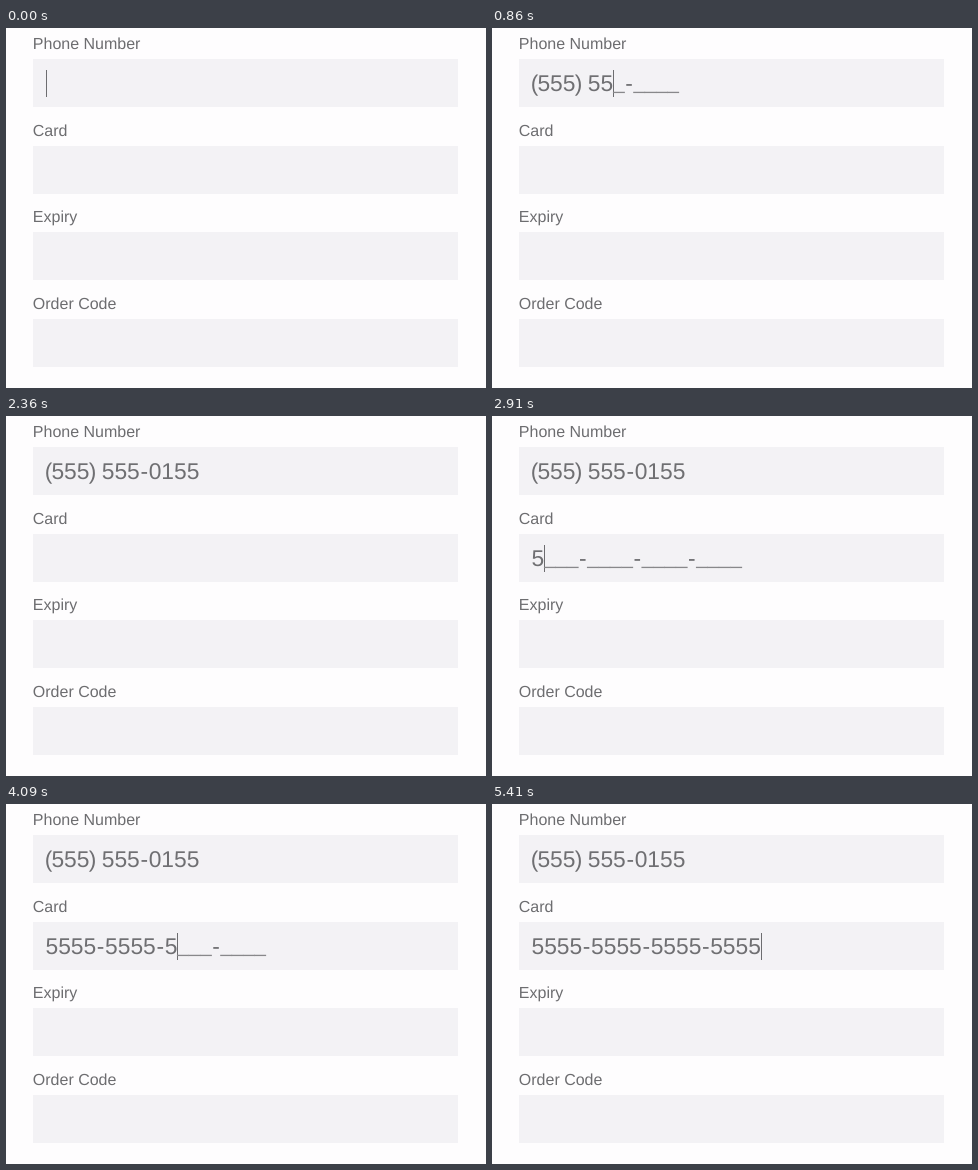
An HTML page for the animation above (5.55 s loop, 480 px wide and 360 px high).

```html
<!DOCTYPE html>
<html lang="en">
<head>
<meta charset="utf-8">
<title>Masked inputs</title>
<style>
  html, body { margin: 0; width: 100%; height: 100%; overflow: hidden; background: #fefdfe; }
  body {
    position: relative;
    font-family: "Liberation Sans", Arial, sans-serif;
    font-kerning: none;
    text-rendering: geometricPrecision;
    color: #6d6d70;
  }
  .row { position: absolute; left: 27px; top: var(--y); width: 425px; height: 80px; }
  .label { position: absolute; left: -.2px; top: 7px; font-size: 16px; line-height: 20px; white-space: pre; }
  .field {
    position: absolute; left: 0; top: 31px; width: 425px; height: 47.5px;
    box-sizing: border-box; padding-left: 12.5px;
    background: #f3f2f5; color: #6f6f72;
    font-size: 22.8px; line-height: 48px; white-space: pre;
  }
  .paren { margin: 0 -.037em; }
  .dash { margin: 0 .028em; }
  .blank { position: relative; top: -1.6px; font-size: .9em; line-height: 1; color: #88888b; }
  .caret {
    display: inline-block; width: 1px; height: 27px; margin-right: -1px;
    vertical-align: -5.7px; background: #6d6d70;
  }
</style>
</head>
<body>
<div class="row" style="--y:0px"><div class="label">Phone Number</div><div class="field" id="phone"></div></div>
<div class="row" style="--y:87px"><div class="label">Card</div><div class="field" id="card"></div></div>
<div class="row" style="--y:173px"><div class="label">Expiry</div><div class="field"></div></div>
<div class="row" style="--y:260px"><div class="label">Order Code</div><div class="field"></div></div>
<script>
const LOOP = 5550;
const inputs = [
  {
    el: document.getElementById('phone'),
    value: '(555) 555-0155',
    focus: 0, blur: 2360,
    keys: [270, 450, 550, 730, 860, 1000, 1180, 1410, 1640, 1820]
  },
  {
    el: document.getElementById('card'),
    value: '5555-5555-5555-5555',
    focus: 2640, blur: LOOP,
    keys: [2910, 3090, 3230, 3360, 3500, 3590, 3770, 3950,
           4090, 4230, 4410, 4550, 4730, 4910, 5090, 5410]
  }
];
const CARET = '<i class="caret"></i>';
const kinds = { '(': 'paren', ')': 'paren', '-': 'dash', '_': 'blank' };
const glyph = c => kinds[c] ? `<span class="${kinds[c]}">${c}</span>` : c;

// Typed digits replace blanks; the caret waits before the next blank.
function markup(value, typed, focused) {
  const caret = focused ? CARET : '';
  if (!typed) return caret;
  let html = '', seen = 0;
  for (const c of value) {
    const digit = /\d/.test(c);
    if (digit && seen === typed) html += caret;
    html += glyph(digit && seen >= typed ? '_' : c);
    if (digit) seen++;
  }
  return seen === typed ? html + caret : html;
}

function draw(now) {
  const t = now % LOOP;
  for (const input of inputs) {
    const typed = input.keys.filter(k => k <= t).length;
    const html = markup(input.value, typed, t >= input.focus && t < input.blur);
    if (html !== input.html) input.el.innerHTML = input.html = html;
  }
}

const start = performance.now();
function tick() {
  draw(performance.now() - start);
  requestAnimationFrame(tick);
}
tick();
</script>
</body>
</html>
```
